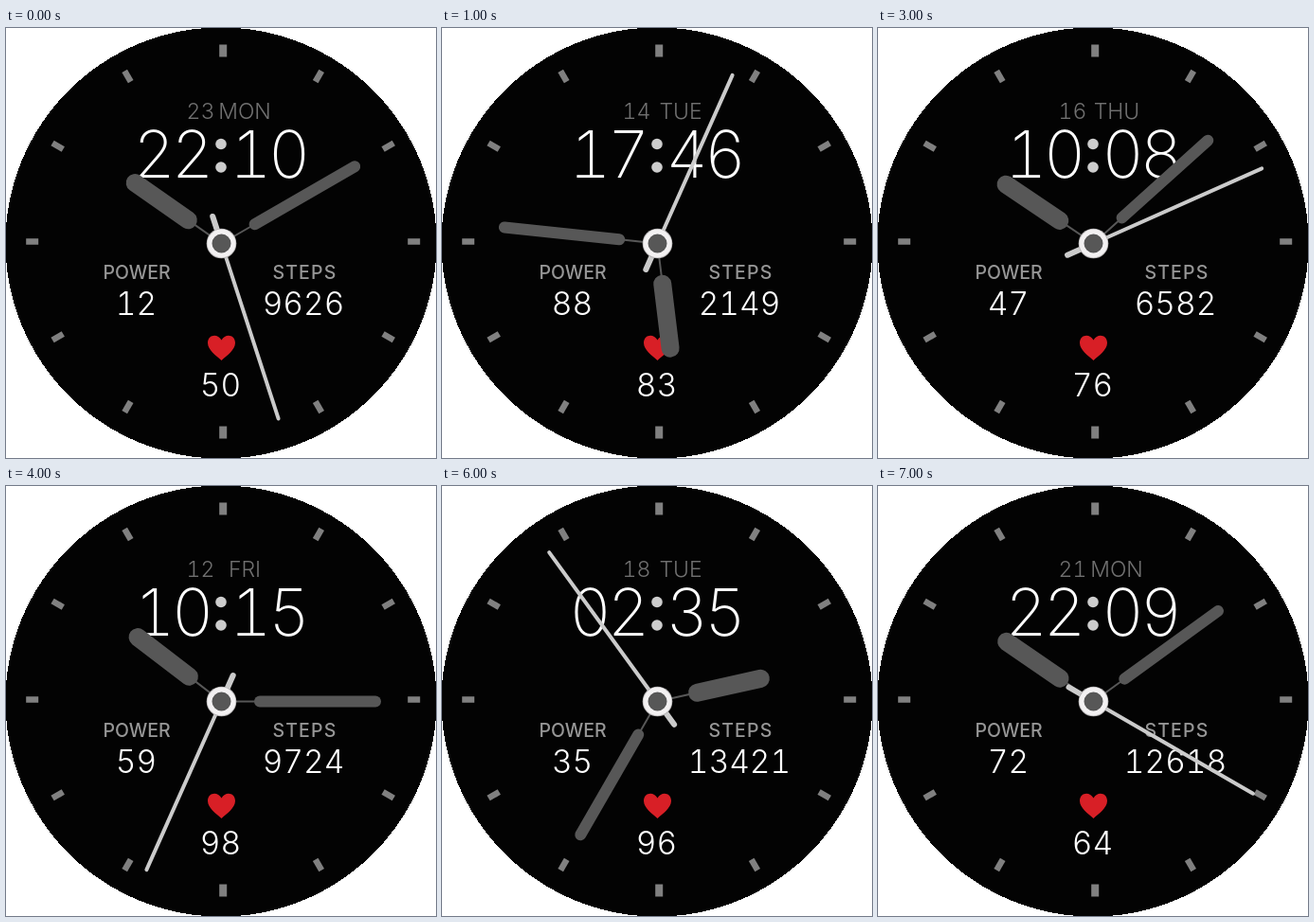
Animation of 454 by 454 pixels, one loop 8000 ms. Source, as an HTML page:

```html
<!DOCTYPE html>
<html lang="en">
<head>
<meta charset="utf-8">
<title>Watch face</title>
<style>
  html, body { margin: 0; width: 100%; height: 100%; overflow: hidden; background: #fff; }
  svg { display: block; width: 454px; height: 454px; }
  text {
    font-family: Inter, Roboto, sans-serif;
    font-variant-numeric: tabular-nums;
    text-anchor: middle;
    fill: #fff;
  }
  .date { font-size: 23px; font-weight: 300; fill: #707070; }
  .time { font-size: 69px; font-weight: 200; }
  .label { font-size: 19.5px; font-weight: 500; fill: #969696; }
  .value { font-size: 33.5px; font-weight: 300; }
  .hand { stroke: #575757; stroke-linecap: round; }
  .sweep { stroke: #cbcbcb; stroke-linecap: round; }
</style>
</head>
<body>
<svg viewBox="0 0 454 454">
  <circle cx="227" cy="227" r="227.6" fill="#030303" shape-rendering="crispEdges"/>
  <g id="ticks" fill="#808080"></g>

  <text id="day" class="date" x="205.5" y="96"></text>
  <text id="weekday" class="date" x="252" y="96"></text>
  <text id="hours" class="time" x="156.5 197" y="158"></text>
  <text id="minutes" class="time" x="258.5 299" y="158"></text>
  <g fill="#cdcdcd">
    <circle cx="227" cy="122.5" r="5.8"/>
    <circle cx="227" cy="147" r="5.8"/>
  </g>

  <text class="label" x="138" y="265">POWER</text>
  <text class="label" x="315.5" y="265" letter-spacing="1.2">STEPS</text>
  <text id="power" class="value" x="137.5" y="303"></text>
  <text id="steps" class="value" x="314" y="303"></text>
  <path fill="#d81f26" d="M227.5 351C222 346 213 340 213 332.5C213 323.500 223.500 322 227.500 329.500C231.500 322 242 323.500 242 332.500C242 340 233 346 227.500 351Z"/>
  <text id="pulse" class="value" x="226.5" y="388.5"></text>

  <g transform="translate(227.5 227.5)">
    <g id="minuteHand" class="hand">
      <path d="M0 0V-40" stroke-width="2"/>
      <path d="M0 -40.5V-162.5" stroke-width="12"/>
    </g>
    <g id="hourHand" class="hand">
      <path d="M0 0V-40" stroke-width="2"/>
      <path d="M0 -43V-111.5" stroke-width="19"/>
    </g>
    <g id="secondHand" class="sweep">
      <path d="M0 0V-194.5" stroke-width="4"/>
      <path d="M0 0V30" stroke-width="6"/>
    </g>
    <circle r="15.8" fill="#b4b2b3"/>
    <circle r="12.5" fill="#575757" stroke="#f3f1f2" stroke-width="5"/>
  </g>
</svg>
<script>
  const STEP = 1000;
  // day, weekday, hours, minutes, seconds, power, steps, pulse
  const readings = [
    "23 MON 22 10 27 12 9626 50",
    "14 TUE 17 46 04 88 2149 83",
    "15 WED 23 05 37 62 4038 124",
    "16 THU 10 08 11 47 6582 76",
    "12 FRI 10 15 34 59 9724 98",
    "17 SAT 10 10 54 83 8305 72",
    "18 TUE 02 35 54 35 13421 96",
    "21 MON 22 09 20 72 12618 64"
  ].map(row => row.split(" "));

  const el = id => document.getElementById(id);
  const turn = (id, angle) => el(id).setAttribute("transform", `rotate(${angle})`);

  function drawTicks() {
    for (let i = 0; i < 12; i++) {
      const tick = document.createElementNS("http://www.w3.org/2000/svg", "rect");
      const width = i % 6 ? 6.5 : 8;
      const attrs = {
        x: -width / 2, y: -208, width, height: 13,
        transform: `translate(229.2 225.5) rotate(${i * 30})`
      };
      for (const key in attrs) tick.setAttribute(key, attrs[key]);
      el("ticks").append(tick);
    }
  }

  function show([day, weekday, hours, minutes, seconds, power, steps, pulse]) {
    const texts = { day, weekday, hours, minutes, power, steps, pulse };
    for (const id in texts) el(id).textContent = texts[id];
    turn("hourHand", hours % 12 * 30 + minutes / 2);
    turn("minuteHand", minutes * 6);
    turn("secondHand", seconds * 6);
  }

  let shown = -1;
  const start = performance.now();

  function tick() {
    const elapsed = Math.max(0, performance.now() - start);
    const index = Math.floor(elapsed / STEP) % readings.length;
    if (index !== shown) show(readings[shown = index]);
    requestAnimationFrame(tick);
  }

  drawTicks();
  tick();
</script>
</body>
</html>
```
